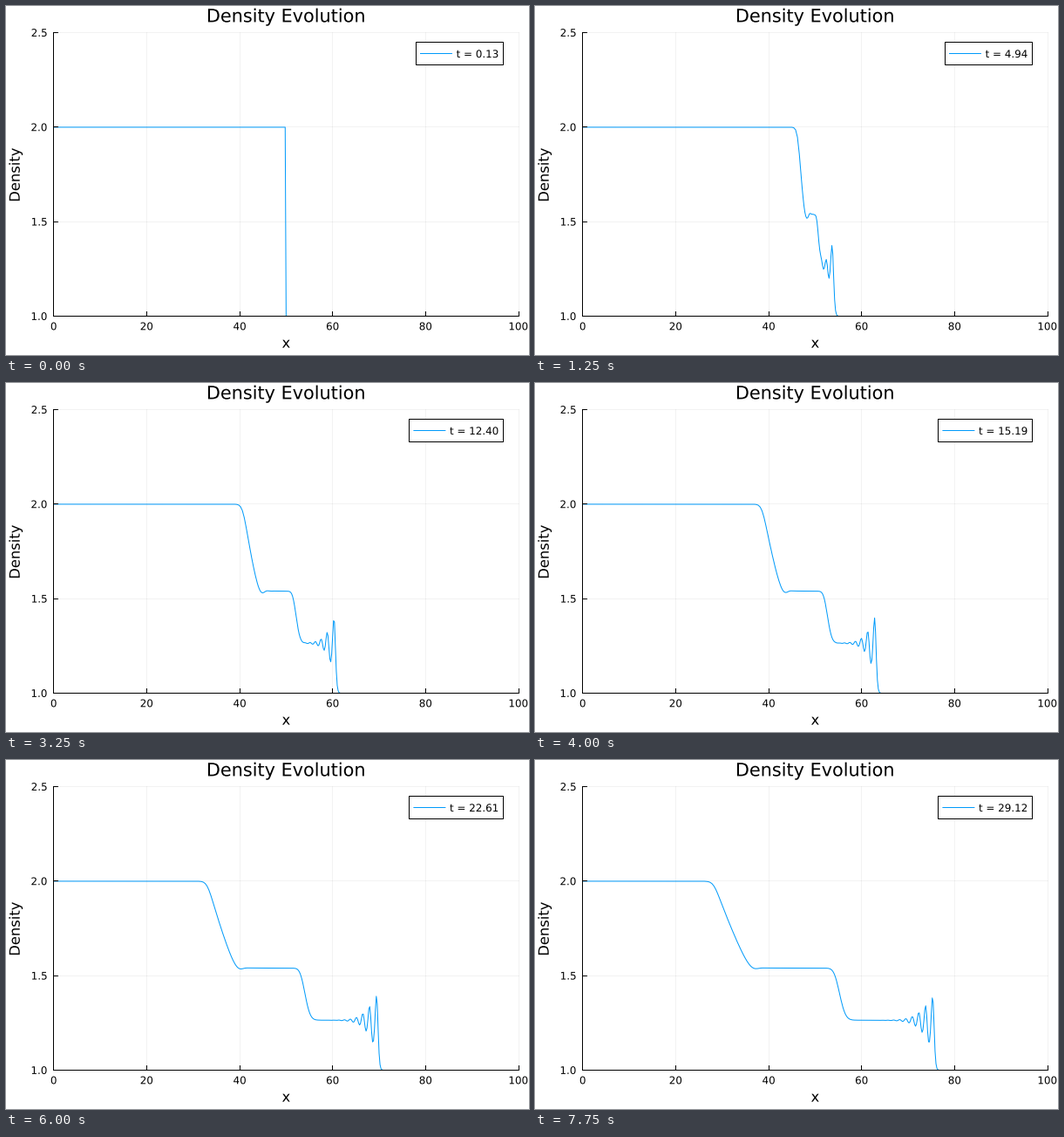
Recreate the animation shown at these times as a matplotlib script. Size 600 by 400 pixels, loop 8000 ms.

```python
import math

import numpy as np
import matplotlib.pyplot as plt
from matplotlib.animation import FuncAnimation
from matplotlib.patches import PathPatch, Rectangle
from matplotlib.textpath import TextPath
from matplotlib.transforms import Affine2D

W, H, DPI = 600, 400, 100
FRAMES, INTERVAL = 32, 250
STEPS_PER_FRAME = 10
PX = 72 / DPI  # points per pixel
LEFT, RIGHT, TOP, BOTTOM = 54.7, 588.0, 30.6, 355.6
BLUE = "#009afa"
SMALL, MEDIUM, LARGE = 11.9, 16.35, 20.8

GAMMA = 1.4
DX = 0.2
x = DX * np.arange(501)

# Simulated time reached after a given number of steps.
STEP_KNOTS = [0, 1, 11, 51, 91, 161, 201, 241, 311]
TIME_KNOTS = [0, 0.1336, 1.13, 4.94, 8.69, 15.19, 18.89, 22.61, 29.12]


def time_at(step):
    return np.interp(step, STEP_KNOTS, TIME_KNOTS)


def hydro_step(q, dt):
    """Donor-cell advection, then centred pressure forces.

    Rows of q: density, momentum, energy density. The pressure is taken
    from the whole energy density, kinetic part included."""
    u = q[1] / q[0]
    ui = 0.5 * (u[1:] + u[:-1])
    flux = np.where(ui > 0, q[:, :-1], q[:, 1:]) * ui
    q = q.copy()
    q[:, 1:-1] -= dt / DX * (flux[:, 1:] - flux[:, :-1])

    u = q[1] / q[0]
    p = (GAMMA - 1) * q[2]
    q[1, 1:-1] -= dt * (p[2:] - p[:-2]) / (2 * DX)
    q[2, 1:-1] -= dt * (p[2:] * u[2:] - p[:-2] * u[:-2]) / (2 * DX)
    return q


def simulate():
    rho = np.where(x < 50 - DX / 2, 2.0, 1.0)
    q = np.array([rho, 0 * rho, rho])
    profiles = []
    for step in range(1, STEPS_PER_FRAME * (FRAMES - 1) + 2):
        q = hydro_step(q, time_at(step) - time_at(step - 1))
        if step % STEPS_PER_FRAME == 1:
            profiles.append(q[0])
    return profiles


def to_px(v):
    return LEFT + (RIGHT - LEFT) * v / 100


def to_py(v):
    return BOTTOM - (BOTTOM - TOP) * (v - 1) / 1.5


def crisp(v):
    """Centre of the pixel that holds v."""
    return math.floor(v) + 0.5


plt.rcParams["font.family"] = "DejaVu Sans"
fig = plt.figure(figsize=(W / DPI, H / DPI), dpi=DPI, facecolor="white")
ax = fig.add_axes([0, 0, 1, 1])
ax.set_xlim(0, W)
ax.set_ylim(H, 0)
ax.axis("off")


def line(xs, ys, color="black", width=1.0, **kw):
    return ax.plot(xs, ys, color=color, lw=width * PX, snap=False, **kw)[0]


def text_path(px, py, text, size, align=0.5, angle=0):
    """Outline of text on baseline py; align None starts it at px."""
    path = TextPath((0, 0), text, size=size)
    box = path.get_extents()
    dx = 0 if align is None else -(box.x0 + align * box.width)
    move = Affine2D().translate(dx, 0).scale(1, -1).rotate_deg(-angle)
    return move.translate(px, py).transform_path(path)


def label(*args, zorder=4, **kw):
    patch = PathPatch(text_path(*args, **kw), fc="black", lw=0,
                      snap=False, zorder=zorder)
    return ax.add_patch(patch)


left, right, top, bottom = map(crisp, (LEFT, RIGHT, TOP, BOTTOM))

for v in range(0, 101, 20):
    px = crisp(to_px(v))
    line([px, px], [top, bottom], alpha=0.1, width=0.5, zorder=1)
    line([px, px], [bottom, bottom - 5], zorder=4)
    label(to_px(v), 371.3, str(v), SMALL)

for v in (1.0, 1.5, 2.0, 2.5):
    py = crisp(to_py(v))
    line([left, right], [py, py], alpha=0.1, width=0.5, zorder=1)
    line([left, left + 5], [py, py], zorder=4)
    label(46.6, to_py(v) + 4.3, f"{v:.1f}", SMALL, align=1)

line([left, right], [bottom, bottom], zorder=4)
line([left, left], [top, bottom], zorder=4)

label(to_px(50), 18.4, "Density Evolution", LARGE)
label(to_px(50), 391.6, "x", MEDIUM)
label(15.7, (TOP + BOTTOM) / 2, "Density", MEDIUM, angle=90)

curve = line([], [], BLUE, zorder=3, solid_joinstyle="round")
curve.set_clip_path(Rectangle((LEFT, TOP), RIGHT - LEFT, 355 - TOP,
                              transform=ax.transData))

box = Rectangle((470.5, 41.5), 100, 26, fc="white", ec="black", lw=PX,
                snap=False, zorder=5)
ax.add_patch(box)
key = line([], [], BLUE, zorder=6)
time_text = label(516.6, 59.1, "t", SMALL, align=None, zorder=6)

profiles = simulate()


def draw(i):
    t = time_at(1 + STEPS_PER_FRAME * i)
    curve.set_data(to_px(x), to_py(profiles[i]))
    # The legend widens to the left for a second digit.
    shift = 7.6 if t >= 10 else 0
    box_left = crisp(470.1 - shift)
    box.set_x(box_left)
    box.set_width(570.5 - box_left)
    key.set_data([475.5 - shift, 511.5 - shift], [54.5, 54.5])
    time_text.set_path(text_path(516.6 - shift, 59.1, f"t = {t:.2f}", SMALL,
                                 align=None))
    return curve, box, key, time_text


anim = FuncAnimation(fig, draw, frames=FRAMES, interval=INTERVAL,
                     repeat=True, repeat_delay=0, blit=False)
plt.show()
```
